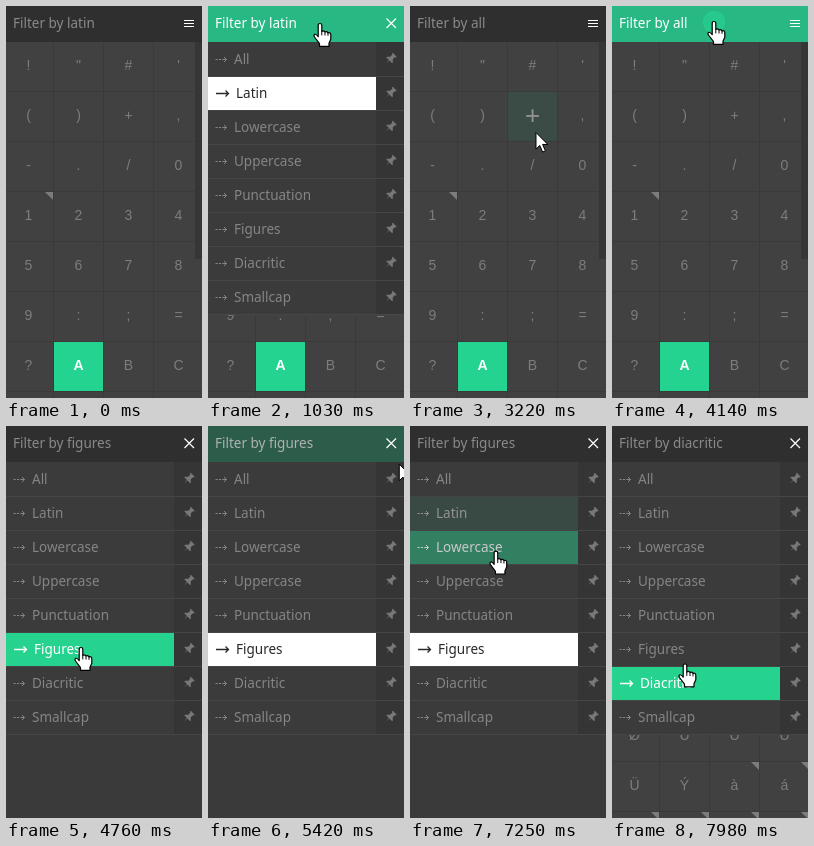
Write an HTML page that moves like this. It is 196 px wide and 392 px high and loops after 8000 ms.

```html
<!DOCTYPE html>
<html lang="en">
<head>
<meta charset="utf-8">
<title>Glyph filter menu</title>
<style>
  html, body { margin: 0; width: 100%; height: 100%; overflow: hidden; background: #3a3a3a; }
  svg { display: block; width: 100%; height: 100%; }
  .label { font: 13.5px "Noto Sans", "Open Sans", sans-serif; }
  .glyph { font: 14px "Liberation Sans", Arial, sans-serif; text-anchor: middle; }
  .line { fill: none; stroke: #fff; stroke-width: 1.2; }
</style>
</head>
<body>
<svg id="stage" viewBox="0 0 196 392"></svg>
<script>
const LOOP = 8000, STEP = 10;
const HOT = 2; // active point of the pointer, below its drawn tip
const names = ['All', 'Latin', 'Lowercase', 'Uppercase', 'Punctuation', 'Figures', 'Diacritic', 'Smallcap'];
const basic = [...'!"#\'()+,-./0123456789:;=?ABCDEFG'];
const sets = {
  Figures: [...'0123456789'],
  Diacritic: [...'ÀÁÂÃÄÅÈÉÊËÌÍÎÏÑÒÓÔÕÖØÙÚÛÜÝàáâãäå']
};

// [time, value]: the last entry reached is in force
const filters = [[0, 'Latin'], [1870, 'All'], [4740, 'Figures'], [7840, 'Diacritic']];
const menus = [[0, false], [780, true], [2620, false], [4240, true], [5760, false], [6790, true]];
const ripples = [700, 2540, 4100, 5700];
const valueAt = (list, t) => list.filter(e => e[0] <= t).pop()[1];

// Cursor path: time, x, y
const path = [
  [0, 150, -30], [430, 150, -30], [630, 116, 16], [700, 112, 18], [1030, 112, 18],
  [1200, 84, 72], [1380, 72, 116], [1500, 70, 112], [1740, 65, 43], [2150, 65, 43],
  [2460, 104, 18], [3080, 104, 18], [3220, 126, 126], [3680, 82, 342], [3900, 82, 342],
  [4060, 102, 16], [4250, 102, 16], [4660, 75, 222], [4780, 75, 222], [5060, 110, 120],
  [5290, 160, 22], [5366, 178, 34], [5420, 191, 38], [5490, 210, 52], [5535, 210, 20],
  [5690, 128, 18], [5970, 128, 18], [6170, 122, 104], [6360, 113, 34], [6410, 112, 18],
  [6700, 104, 18], [7000, 104, 18], [7280, 84, 140], [7520, 74, 256], [7780, 73, 238.5], [8000, 73, 238.5]
];

function slope(i, k) {
  const a = path[i - 1], b = path[i], c = path[i + 1];
  if (!a || !c || a[k] === b[k] || b[k] === c[k] || (b[k] - a[k]) * (c[k] - b[k]) < 0) return 0;
  return (c[k] - a[k]) / (c[0] - a[0]);
}

function cursorAt(t) {
  let i = 0;
  while (i < path.length - 2 && path[i + 1][0] <= t) i++;
  const a = path[i], b = path[i + 1], d = b[0] - a[0], u = (t - a[0]) / d;
  const h = u * u * (3 - 2 * u), g = u * (1 - u) * (1 - u), e = u * u * (u - 1);
  return [1, 2].map(k => a[k] + (b[k] - a[k]) * h + d * (g * slope(i, k) + e * slope(i + 1, k)));
}

function targetAt(t) {
  const [x, tip] = cursorAt(t), y = tip + HOT;
  if (x < 0 || x > 196 || y < 0) return '';
  if (y < 36) return 'head';
  if (valueAt(menus, t) && y < 308) return x < 168 ? 'item' + Math.floor((y - 36) / 34) : '';
  return 'cell' + (Math.floor((y - 36) / 50) * 4 + Math.floor((x + 2) / 50));
}

// Hover levels, sampled over the whole loop; cells drop theirs at once
const hover = [];
for (let t = 0, levels = {}; t <= LOOP; t += STEP) {
  const target = targetAt(t), next = {};
  if (target && !(target in levels)) levels[target] = 0;
  for (const id in levels) {
    const cell = id.startsWith('cell');
    const change = id === target ? STEP / (cell ? 150 : 90) : cell ? -1 : -STEP / 90;
    const v = Math.min(1, levels[id] + change);
    if (v > 0) next[id] = v;
  }
  hover.push(levels = next);
}

const mix = (a, b, u) => `rgb(${a.map((v, i) => Math.round(v + (b[i] - v) * u))})`;
const grey = v => [v, v, v];
const white = grey(255);

function add(parent, tag, attrs = {}, text = '') {
  const el = document.createElementNS('http://www.w3.org/2000/svg', tag);
  set(el, attrs);
  el.textContent = text;
  parent.appendChild(el);
  return el;
}
function set(el, attrs) {
  for (const k in attrs) el.setAttribute(k, attrs[k]);
}
const show = (el, on) => set(el, { display: on ? 'inline' : 'none' });

const stage = document.getElementById('stage');
add(stage, 'rect', { width: 196, height: 392, fill: '#3a3a3a' });

const cells = Array.from({ length: 32 }, (_, i) => {
  const x = i % 4 * 50 - 2, y = 36 + Math.floor(i / 4) * 50;
  const g = add(stage, 'g', { transform: `translate(${x} ${y})` });
  return {
    g,
    box: add(g, 'rect', { width: 49, height: 49 }),
    text: add(g, 'text', { class: 'glyph', y: 5 }),
    corner: add(g, 'path', { d: 'M41 0h8v8z', fill: '#7c7c7c' })
  };
});
const thumb = add(stage, 'rect', { x: 189, y: 36, width: 7, height: 217, fill: '#363636' });

const menu = add(stage, 'g');
add(menu, 'rect', { y: 36, width: 196, height: 272, fill: '#3b3b3b' });
add(menu, 'rect', { x: 168, y: 36, width: 28, height: 272, fill: '#353535' });
const items = names.map((name, i) => {
  const g = add(menu, 'g', { transform: `translate(0 ${36 + i * 34})` });
  add(g, 'rect', { y: 34, width: 196, height: 1, fill: '#464646' });
  const pin = add(g, 'g', { transform: 'translate(182.5 17) rotate(45) scale(.92)', fill: '#787878' });
  add(pin, 'path', { d: 'M-3-6.5h6v1.5h-1v3.5l2.5 2.5v1h-4.1l-.4 5-.4-5h-4.1v-1l2.5-2.5v-3.5h-1z' });
  return {
    box: add(g, 'rect', { y: 1, width: 168, height: 33 }),
    arrow: add(g, 'path', { fill: 'none' }),
    text: add(g, 'text', { class: 'label', y: 22 }, name)
  };
});

const head = add(stage, 'rect', { width: 196, height: 36 });
const clip = add(stage, 'clipPath', { id: 'bar' });
add(clip, 'rect', { width: 196, height: 36 });
const ripple = add(add(stage, 'g', { 'clip-path': 'url(#bar)' }), 'circle', { fill: '#25d692' });
const title = add(stage, 'text', { class: 'label', x: 7, y: 22 });
const bars = add(stage, 'path', { class: 'line', d: 'M178 14.5h10M178 17.5h10M178 20.5h10' });
const cross = add(stage, 'path', { class: 'line', d: 'M178.5 12.5l9.5 9.5m0-9.5l-9.5 9.5' });

const ink = { fill: '#fff', stroke: '#000', 'stroke-linejoin': 'round' };
const arrow = add(stage, 'path', {
  ...ink, 'stroke-width': 1,
  d: 'M0 0v16.5l3.8-3.6 2.8 6.6 2.8-1.2-2.8-6.4h5.2z'
});
const hand = add(stage, 'g');
add(hand, 'path', {
  ...ink, 'stroke-width': 1.2,
  d: 'M-1.8 1.2q0-1.7 1.8-1.7t1.8 1.7v6.2q1.8-1.3 3.2.6 1.8-.9 3 .8 2.8-.7 2.8 2v4.5l-1.8 4v3h-9.5v-2.6l-5-6.7q-1.2-2.2.4-2.7 1.3-.3 3.3 2.4z'
});
add(hand, 'path', { fill: 'none', stroke: '#000', d: 'M1.8 7.4v4M5 8v3.5M8 8.8v3' });

function drawCells(filter, levels) {
  const glyphs = sets[filter] || basic;
  cells.forEach(({ g, box, text, corner }, i) => {
    const c = glyphs[i];
    show(g, c);
    if (!c) return;
    const chosen = c === 'A', u = chosen ? 0 : levels['cell' + i] || 0;
    const size = 1 + 0.85 * Math.min(1, u * 4);
    set(box, { fill: chosen ? '#25d390' : mix(grey(65), [46, 95, 76], u) });
    set(text, {
      transform: `translate(24.5 23) scale(${size})`,
      fill: chosen ? '#fff' : mix(grey(125), grey(190), u)
    });
    text.style.fontWeight = chosen ? 700 : 400;
    text.textContent = c;
    show(corner, c === '1' || /[à-ÿ]/.test(c));
  });
  show(thumb, filter !== 'Figures');
}

function drawItems(filter, levels) {
  items.forEach(({ box, arrow, text }, i) => {
    const active = names[i] === filter, u = levels['item' + i] || 0;
    const color = mix(grey(active ? 40 : 133), white, u);
    set(box, { fill: active ? mix(white, [37, 210, 142], u) : mix(grey(59), [42, 181, 128], u) });
    set(text, { x: active ? 28 : 26, fill: color });
    text.style.fontWeight = u > 0.7 ? 500 : 400;
    set(arrow, {
      d: active ? 'M8 17.5h12.5m-3-3l3 3-3 3' : 'M7.5 17.5h2.2m1.2 0h2.2m1.2 0h4.2m-2.5-2.5l2.5 2.5-2.5 2.5',
      stroke: color, 'stroke-width': active ? 1.3 : 1
    });
  });
}

function drawHead(t, filter, open, level) {
  set(head, { fill: mix(grey(47), [39, 184, 131], level) });
  set(title, { fill: mix(grey(138), white, level) });
  title.style.fontWeight = level > 0.7 ? 500 : 400;
  title.textContent = 'Filter by ' + filter.toLowerCase();
  show(bars, !open);
  show(cross, open);
  const start = ripples.find(r => t >= r && t < r + 200);
  show(ripple, start);
  if (start) {
    const [x, y] = cursorAt(start), u = (t - start) / 200;
    set(ripple, { cx: x, cy: y, r: 8 + 16 * u, opacity: 0.7 * (1 - u) });
  }
}

function drawCursor(t) {
  const [x, y] = cursorAt(t), pointing = /head|item/.test(targetAt(t));
  show(hand, pointing);
  show(arrow, !pointing);
  set(pointing ? hand : arrow, { transform: `translate(${x} ${y})` });
}

function render(t) {
  const filter = valueAt(filters, t), open = valueAt(menus, t);
  const levels = hover[Math.floor(t / STEP)];
  drawCells(filter, levels);
  show(menu, open);
  drawItems(filter, levels);
  drawHead(t, filter, open, levels.head || 0);
  drawCursor(t);
}

const began = performance.now();
function tick() {
  render((performance.now() - began) % LOOP);
  requestAnimationFrame(tick);
}
tick();
</script>
</body>
</html>
```
